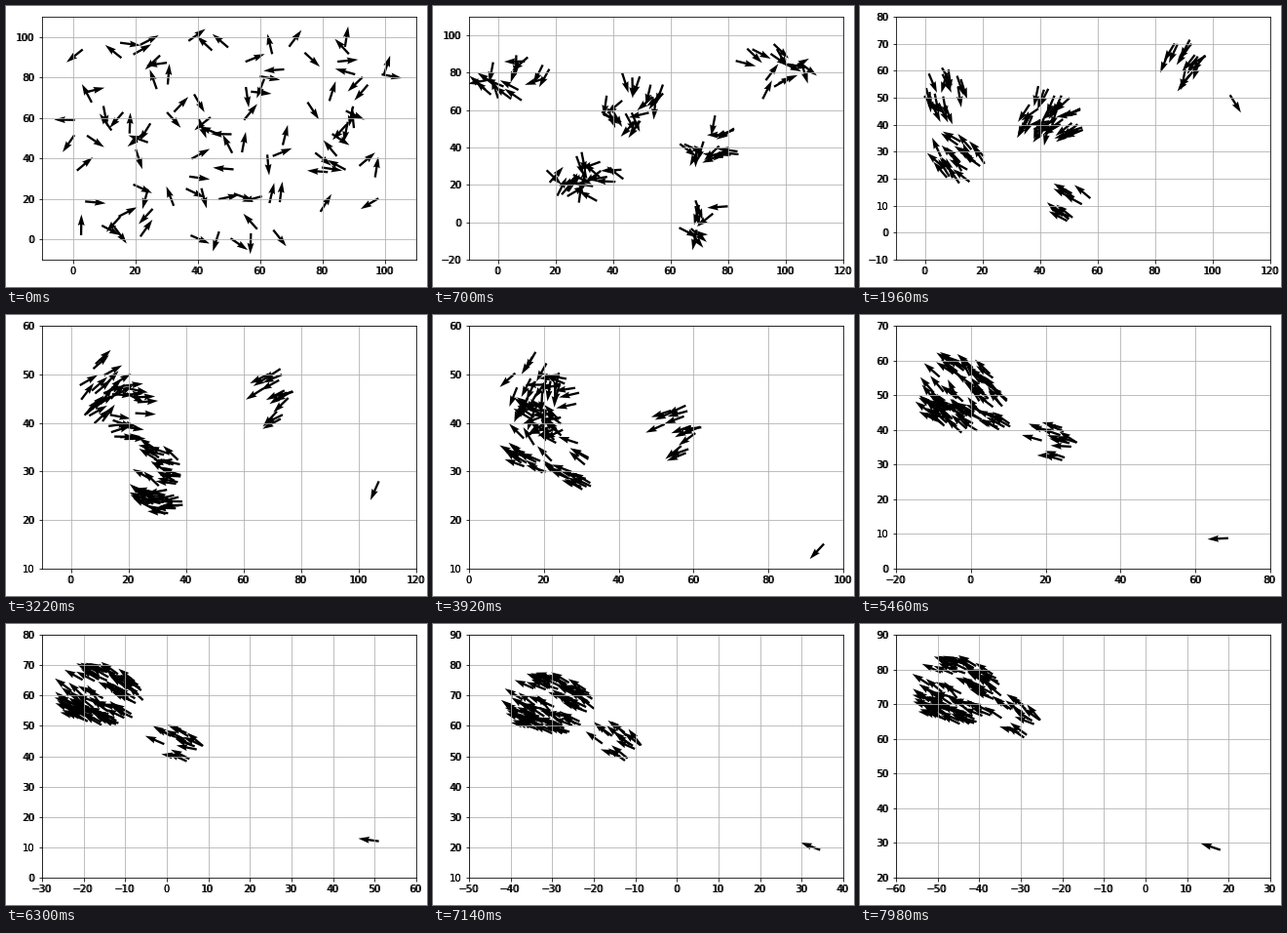
A matplotlib script that plays this animation: 432 px wide and 288 px high, repeating every 8 s.

```python
import numpy as np
import matplotlib.pyplot as plt
from matplotlib.animation import FuncAnimation

W, H, DPI = 432, 288, 72
STEP_MS, INTERVAL, LOOP = 140, 40, 8000
COUNT, SPEED = 100, 3

# Waypoints (x + yj) of each flock at these steps; most of them merge into MAIN.
KEYS = [5, 14, 23, 27, 33, 45, 57]
AWAY = [-14.5 + 59j, -43.5 + 73j]
MAIN = [10 + 42j] + AWAY
JOIN = [32 + 28j, 21 + 35j] + MAIN
PATHS = np.array([
    [6.5 + 77j, 6 + 54j, 18 + 42j, 25 + 44j] + MAIN,
    [46 + 67j, 41 + 47j] + JOIN,
    [30 + 24j, 13 + 26j, 9 + 46j, 18 + 49j] + MAIN,
    [72 + 2j, 53 + 9j] + JOIN,
    [75 + 45j, 50 + 43j, 35 + 27j, 30 + 30j, 23 + 34j] + AWAY,
    [94 + 84j, 91 + 65j, 72 + 46j, 60 + 40j, 43 + 34j, 4 + 43j, -30 + 65j],
    [92 + 66j, 106 + 51j, 107 + 28j, 97 + 17j, 85 + 10j, 51 + 12j, 18 + 28j],
])


def loose(step):
    """How far flocks still are from their final tightness."""
    return 1 + 3 * np.exp(-np.asarray(step) / 7)


def to_disc(z):
    """Spread points over a unit disc, keeping their arrangement."""
    def unit(a):
        return 2 * (a - a.min()) / max(np.ptp(a), 1) - 1
    x, y = unit(z.real), unit(z.imag)
    return x * np.sqrt(1 - y**2 / 2) + 1j * y * np.sqrt(1 - x**2 / 2)


rng = np.random.default_rng(7)
start = rng.uniform(0, 100, COUNT) + 1j * rng.uniform(0, 100, COUNT)
start[0] = 90 + 55j
wobble = 0.14 * rng.standard_normal(COUNT)

# Every bird joins the nearest flock, except the first, which flies alone.
flock = np.argmin(abs(start[:, None] - PATHS[:-1, 0]), axis=1)
flock[0] = len(PATHS) - 1
spot = np.zeros(COUNT, complex)
for f in np.unique(flock):
    spot[flock == f] = to_disc(start[flock == f])

centre = PATHS[flock].T
crowd = (centre[:, :, None] == centre[:, None, :]).sum(axis=2)
radius = 2 * np.cbrt(crowd - 1) * loose(KEYS)[:, None]

times = np.array([0] + KEYS)
pos = np.vstack([start, centre + radius * spot])
vel = np.gradient(pos, times, axis=0)
vel[0] = SPEED * np.exp(2j * np.pi * rng.random(COUNT))


def state(step):
    """Positions and unit headings on a cubic path through the waypoints."""
    k = min(np.searchsorted(times, step, "right") - 1, len(times) - 2)
    dt = times[k + 1] - times[k]
    t = (step - times[k]) / dt
    s = 1 - t
    (p0, p1), (v0, v1) = pos[k:k + 2], vel[k:k + 2]
    p = s**2 * ((1 + 2 * t) * p0 + t * dt * v0) + t**2 * ((1 + 2 * s) * p1 - s * dt * v1)
    v = 6 * t * s * (p1 - p0) / dt + s * (1 - 3 * t) * v0 + t * (3 * t - 2) * v1
    return p, np.exp(1j * (np.angle(v) + wobble * loose(step)))


def limits(values):
    return 10 * round(values.min() / 10) - 10, 10 * round(values.max() / 10) + 10


def add_axes(x, **kwargs):
    return fig.add_axes([x / W, 28 / H, 384 / W, 249 / H], **kwargs)


fig = plt.figure(figsize=(W / DPI, H / DPI), dpi=DPI)
ax = add_axes(37)
ax.grid(True)
# The labels are printed twice, one pixel apart.
echo = add_axes(36, frameon=False)
echo.tick_params(length=0, pad=7)

p, d = state(0)
birds = ax.quiver(p.real, p.imag, d.real, d.imag, scale=18, width=0.006)


def draw(i):
    p, d = state((i * INTERVAL + INTERVAL // 2) // STEP_MS)
    birds.set_offsets(np.column_stack([p.real, p.imag]))
    birds.set_UVC(d.real, d.imag)
    for a in (ax, echo):
        a.set_xlim(limits(p.real))
        a.set_ylim(limits(p.imag))
    return [birds]


anim = FuncAnimation(fig, draw, frames=LOOP // INTERVAL, interval=INTERVAL, repeat=True)
plt.show()
```
